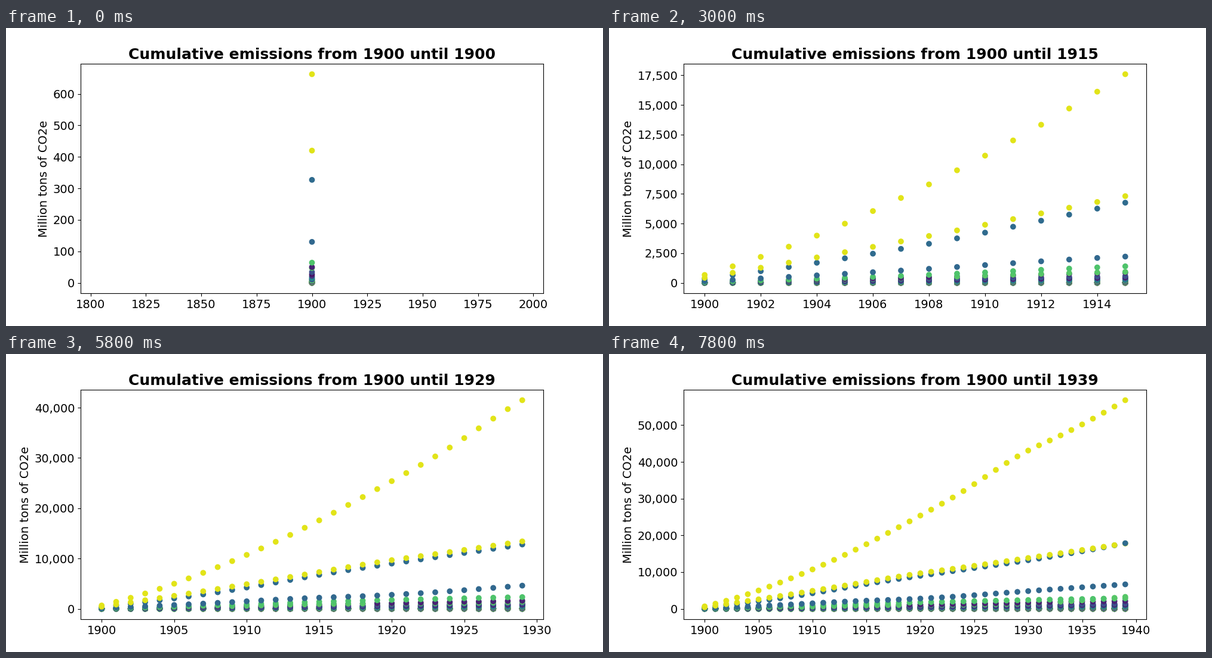
A matplotlib script for the animation above (8 s loop, 1000x500 px).

```python
import numpy as np
import matplotlib.pyplot as plt
from matplotlib.animation import FuncAnimation
from matplotlib.ticker import StrMethodFormatter

START, COUNT, STEP_MS = 1900, 40, 200
years = START + np.arange(COUNT)

plt.rcParams["font.family"] = "DejaVu Sans"
plt.rcParams["font.size"] = 14


def smooth(points):
    """Cubic Hermite curve through {year: total} points, one value per year."""
    t, v = np.array(list(points)), np.array(list(points.values()))
    slope = np.gradient(v, t, edge_order=2)
    k = np.clip(np.searchsorted(t, years, side="right") - 1, 0, len(t) - 2)
    span = t[k + 1] - t[k]
    u = (years - t[k]) / span
    ease = u * u * (3 - 2 * u)
    bend = u * (1 - u) * (slope[k] * (1 - u) - slope[k + 1] * u)
    return v[k] + (v[k + 1] - v[k]) * ease + span * bend


def growth(first, last):
    """Power curve from the first year's emissions to the last total."""
    power = np.log(last / first) / np.log(COUNT)
    return first * (years - START + 1.0) ** power


# Large emitters: hue and a few key totals in million tons
curves = [
    (0.957, smooth({1900: 662.7, 1903: 3045, 1907: 7153, 1913: 14695, 1919: 23810,
                    1923: 30303, 1930: 43103, 1933: 47218, 1939: 56818})),
    (0.953, smooth({1900: 420, 1907: 3485, 1913: 6330, 1920: 9680,
                    1923: 10880, 1929: 13412, 1939: 17780})),
    (0.345, smooth({1900: 327, 1907: 2861, 1917: 7700, 1923: 10260,
                    1933: 14640, 1939: 17860})),
    (0.335, smooth({1900: 130, 1907: 1032, 1914: 2095, 1919: 2640,
                    1923: 3290, 1929: 4608, 1939: 6656})),
    (0.720, smooth({1900: 64, 1907: 580, 1915: 1390, 1923: 1960, 1939: 2840})),
    (0.735, smooth({1900: 47, 1907: 390, 1914: 870, 1918: 1030,
                    1921: 1070, 1931: 1600, 1939: 3250})),
    (0.090, smooth({1900: 50, 1907: 415, 1915: 850, 1923: 1290, 1939: 2110})),
]

# Medium emitters shrink step by step
for k, hue in enumerate([0.245, 0.055, 0.17, 0.48, 0.44, 0.2, 0.62, 0.83]):
    curves.append((hue, growth(34 * 0.8 ** k, 1400 * 0.87 ** k)))

# Many small emitters crowd the baseline
rng = np.random.default_rng(4)
for hue in rng.permutation(np.linspace(0, 1, 50)):
    size = rng.random() ** 4
    curves.append((hue, growth(0.02 + 4 * size, 2 + 250 * size)))

hues = np.array([hue for hue, _ in curves])
totals = np.array([total for _, total in curves])
# Within a year, larger totals lie on top
order = np.argsort(totals, axis=0)
totals = np.take_along_axis(totals, order, axis=0)
hues = hues[order]

fig, ax = plt.subplots(figsize=(10, 5), dpi=100)


def update(i):
    n = i + 1
    ax.clear()
    ax.scatter(np.repeat(years[:n], len(totals)), totals[:, :n].T.ravel(),
               c=hues[:, :n].T.ravel(), cmap="viridis", vmin=0, vmax=1)
    ax.yaxis.set_major_formatter(StrMethodFormatter("{x:,.0f}"))
    ax.set_ylabel("Million tons of CO2e")
    ax.set_title(f"Cumulative emissions from {START} until {years[i]}",
                 fontsize=18, fontweight="bold")


anim = FuncAnimation(fig, update, frames=COUNT, init_func=lambda: update(0),
                     interval=STEP_MS, repeat=True, repeat_delay=0)
plt.show()
```
